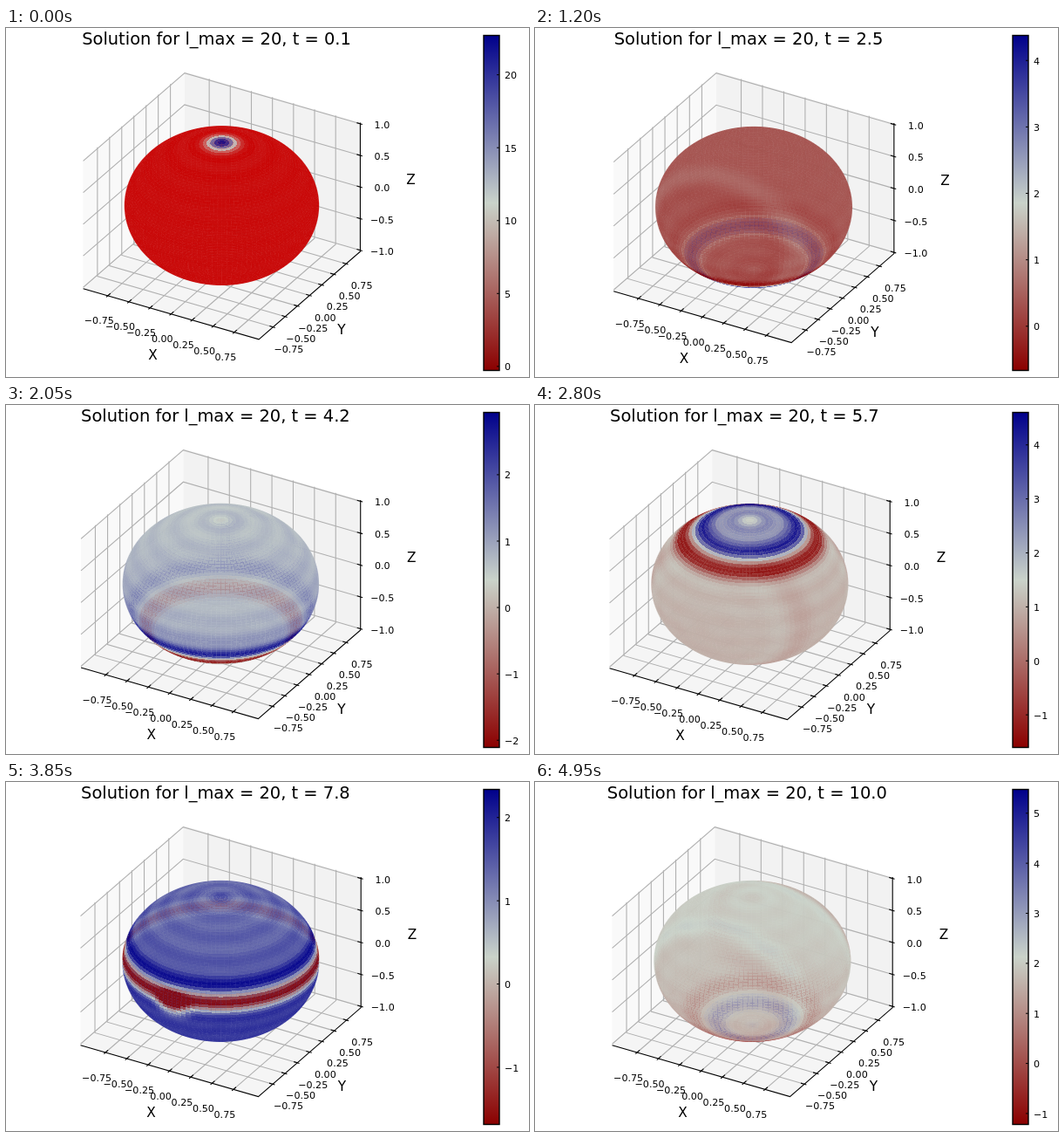
Animation of 600 by 400 pixels, one loop 5000 ms. Source, as an HTML page with a canvas:

```html
<!DOCTYPE html>
<html>
<head>
<meta charset="utf-8">
<style>
html, body { margin: 0; width: 100%; height: 100%; overflow: hidden; background: #fff; }
canvas { display: block; }
</style>
</head>
<body>
<canvas id="stage" width="600" height="400"></canvas>
<script>
const ctx = document.getElementById('stage').getContext('2d');
const layer = document.createElement('canvas');
layer.width = 240; layer.height = 200;
const layerCtx = layer.getContext('2d');
const pixels = layerCtx.createImageData(240, 200);

const L_MAX = 20, SAMPLES = 240, ROWS = 80, COLS = 120;
const R = 113, RZ = 73.3, LIM = 1.042, LIM_Z = 1.02;
const clamp = (v, a = 0, b = 1) => Math.max(a, Math.min(b, v));
const mix = (a, b, k) => a + (b - a) * k;

// Legendre polynomials on an even grid of polar angles
const legendre = Array.from({ length: SAMPLES + 1 }, (_, i) => {
  const x = Math.cos(i / SAMPLES * Math.PI), p = [1, x];
  for (let l = 2; l <= L_MAX; l++) p[l] = ((2 * l - 1) * x * p[l - 1] - (l - 1) * p[l - 2]) / l;
  return p;
});

// Wave equation on the unit sphere: Gaussian bump (width 0.1) with a
// displacement and a velocity part; the l = 0 mode drifts linearly
function pulse(t, displacement, velocity = 0) {
  const c = [];
  for (let l = 0; l <= L_MAX; l++) {
    const w = Math.sqrt(l * (l + 1));
    const motion = displacement * Math.cos(w * t) + velocity * (l ? Math.sin(w * t) / w : t);
    c[l] = (2 * l + 1) / (4 * Math.PI) * Math.exp(-0.005 * w * w) * motion;
  }
  return legendre.map(p => p.reduce((sum, v, l) => sum + v * c[l], 0));
}

// For every mesh cell: angles to the pole and to a scatterer on the equator
const cells = [];
const angleIndex = c => Math.round(Math.acos(clamp(c, -1, 1)) / Math.PI * SAMPLES);
for (let i = 0; i < ROWS; i++) for (let j = 0; j < COLS; j++) {
  const th = (i + 0.5) / ROWS * Math.PI, ph = (j + 0.5) / COLS * 2 * Math.PI;
  cells.push([angleIndex(Math.cos(th)), angleIndex(-Math.sin(th) * Math.sin(ph))]);
}

// The scatterer sends out a weak wave each time the main ring crosses it
function field(t) {
  const main = pulse(t, 1.6, 2), echo = new Array(SAMPLES + 1).fill(0);
  [1, -1, -1].forEach((sign, k) => {
    const age = t - 1.48 - 3.1 * k;
    if (age >= 0) pulse(age, 0.12 * sign).forEach((v, i) => echo[i] += v);
  });
  return {
    lo: Math.min(...main), hi: Math.max(...main),
    values: cells.map(([i, j]) => main[i] + echo[j])
  };
}

const BLUE = [0, 0, 139], GREY = [202, 211, 202], RED = [139, 0, 0];
function colour(v, low = RED) {
  const [a, b, k] = v < 0.5 ? [low, GREY, v * 2] : [GREY, BLUE, v * 2 - 1];
  return a.map((c, i) => mix(c, b[i], clamp(k)));
}

function text(str, x, y, size, align = 'center') {
  ctx.font = size + 'px "DejaVu Sans", sans-serif';
  ctx.textAlign = align;
  ctx.fillStyle = '#000';
  ctx.fillText(str, x, y + size * 0.365);
}
function path(points, stroke, width = 1, fill) {
  ctx.beginPath();
  points.forEach(p => ctx.lineTo(p[0], p[1]));
  if (fill) { ctx.fillStyle = fill; ctx.fill(); }
  if (stroke) { ctx.strokeStyle = stroke; ctx.lineWidth = width; ctx.stroke(); }
}
const number = (v, digits) => v.toFixed(digits).replace('-', '\u2212');

function drawBox(cx, cy, s) {
  const at = (x, y, z) => [cx + R * s * (0.866 * x + 0.5 * y), cy + R * s * (0.25 * x - 0.433 * y) - RZ * s * z];
  const A = LIM, Z = LIM_Z;
  path([at(-A, -A, -Z), at(-A, A, -Z), at(-A, A, Z), at(-A, -A, Z)], null, 0, '#f9f9f9');
  path([at(-A, A, -Z), at(A, A, -Z), at(A, A, Z), at(-A, A, Z)], null, 0, '#f2f2f2');
  path([at(-A, -A, -Z), at(A, -A, -Z), at(A, A, -Z), at(-A, A, -Z)], null, 0, '#f5f5f5');
  for (let i = -3; i <= 3; i++) {
    const v = i / 4;
    path([at(v, -A, -Z), at(v, A, -Z), at(v, A, Z)], '#b0b0b0', 1.1);
    path([at(A, v, -Z), at(-A, v, -Z), at(-A, v, Z)], '#b0b0b0', 1.1);
  }
  for (let z = -1; z <= 1; z += 0.5) path([at(-A, -A, z), at(-A, A, z), at(A, A, z)], '#b0b0b0', 1.1);
  path([at(-A, -A, -Z), at(A, -A, -Z), at(A, A, -Z), at(A, A, Z)], '#000', 1.1);

  const tick = (p, dx, dy, ox, oy, label) => {
    path([[p[0] - dx, p[1] - dy], [p[0] + dx * 0.6, p[1] + dy * 0.6]], '#000', 1.1);
    text(label, p[0] + ox, p[1] + oy, 11.1);
  };
  for (let i = -3; i <= 3; i++) {
    tick(at(i / 4, -A, -Z), -3, 2.6, -10, 28.5, number(i / 4, 2));
    tick(at(A, i / 4, -Z), 4, 1.2, 18, 25, number(i / 4, 2));
  }
  for (let z = -1; z <= 1; z += 0.5) tick(at(A, A, z), 4, 1.2, 25, 1, number(z, 1));
  text('X', cx - 80 * s, cy + 173 * s, 15.3);
  text('Y', cx + 139 * s, cy + 143.5 * s, 15.3);
  text('Z', cx + 219.5 * s, cy - 30.5 * s, 15.3);
}

function drawSphere(cx, cy, s, colours) {
  const x0 = Math.round(cx) - 120, y0 = Math.round(cy) - 100;
  const k = RZ / R, n = Math.hypot(0.5, k), data = pixels.data;
  const sample = (p, q, z) => {
    const row = Math.acos(clamp(z, -1, 1)) / Math.PI * ROWS;
    const phi = Math.atan2(0.5 * p - 0.866 * q, 0.5 * q + 0.866 * p) / (2 * Math.PI);
    const col = (phi + 1) % 1 * COLS;
    const edge = row % 1 < 0.2 || col % 1 < 0.17;
    return [colours[Math.min(ROWS - 1, row | 0) * COLS + (col | 0)], edge ? 0.72 : 0.86];
  };
  data.fill(0);
  for (let j = 0; j < 200; j++) for (let i = 0; i < 240; i++) {
    const p = (x0 + i + 0.5 - cx) / (R * s), b = (y0 + j + 0.5 - cy) / (R * s * n);
    const h = 1 - p * p - b * b;
    if (h < -0.01) continue;
    const d = Math.sqrt(Math.max(0, h)), o = (j * 240 + i) * 4;
    const [front, fa] = sample(p, (0.5 * b + k * d) / n, (-k * b + 0.5 * d) / n);
    const [back, ba] = sample(p, (0.5 * b - k * d) / n, (-k * b - 0.5 * d) / n);
    const under = ba * (1 - fa), alpha = fa + under;
    for (let c = 0; c < 3; c++) data[o + c] = (front[c] * fa + back[c] * under) / alpha;
    data[o + 3] = 255 * alpha * clamp(h * 50 + 0.5);
  }
  layerCtx.putImageData(pixels, 0, 0);
  ctx.drawImage(layer, x0, y0);
}

function drawBar(ticks, digits, toY) {
  const g = ctx.createLinearGradient(0, 8.5, 0, 392.5);
  [BLUE, GREY, RED].forEach((c, i) => g.addColorStop(i / 2, `rgb(${c})`));
  ctx.fillStyle = g;
  ctx.fillRect(548, 8.5, 18, 384);
  ctx.strokeStyle = '#000';
  ctx.lineWidth = 1.4;
  ctx.strokeRect(548, 8.5, 18, 384);
  for (const v of ticks) {
    path([[563, toY(v)], [566, toY(v)]], '#000', 1);
    text(number(v, digits), 572, toY(v) + 0.5, 11.1, 'left');
  }
}

function draw(n) {
  const { lo, hi, values } = field(n / 10), span = hi - lo;
  const label = ((n + 1) / 10).toFixed(1);
  const toY = v => 392.5 - (v - lo) / span * 384;

  const step = span < 3.4 ? 0.5 : span < 8 ? 1 : span < 10 ? 2 : span < 18 ? 2.5 : 5;
  const digits = step % 1 ? 1 : 0, ticks = [];
  for (let i = Math.ceil(lo / step - 1e-3); i * step <= hi; i++) ticks.push(i * step);

  // The plot makes room for the widest and the lowest bar label
  ctx.font = '11.1px "DejaVu Sans", sans-serif';
  const wide = Math.max(...ticks.map(v => ctx.measureText(number(v, digits)).width));
  const s = 1 - 0.022 * clamp((toY(ticks[0]) - 383) / 9);
  const cx = 246.4 + (16.3 - wide) / 2 + (label.length - 3) * 3, cy = 205.4 - 155 * (1 - s);

  const low = [mix(139, 200, clamp((span - 12) / 8)), 0, 0];
  ctx.fillStyle = '#fff';
  ctx.fillRect(0, 0, 600, 400);
  drawBox(cx, cy, s);
  drawSphere(cx, cy, s, values.map(v => colour((v - lo) / span, low)));
  drawBar(ticks, digits, toY);
  text(`Solution for l_max = 20, t = ${label}`, cx - 6, 12.2, 19.44);
}

let shown = -1;
function loop() {
  const n = Math.floor(performance.now() / 50) % 100;
  if (n !== shown) draw(shown = n);
  requestAnimationFrame(loop);
}
loop();
</script>
</body>
</html>
```
